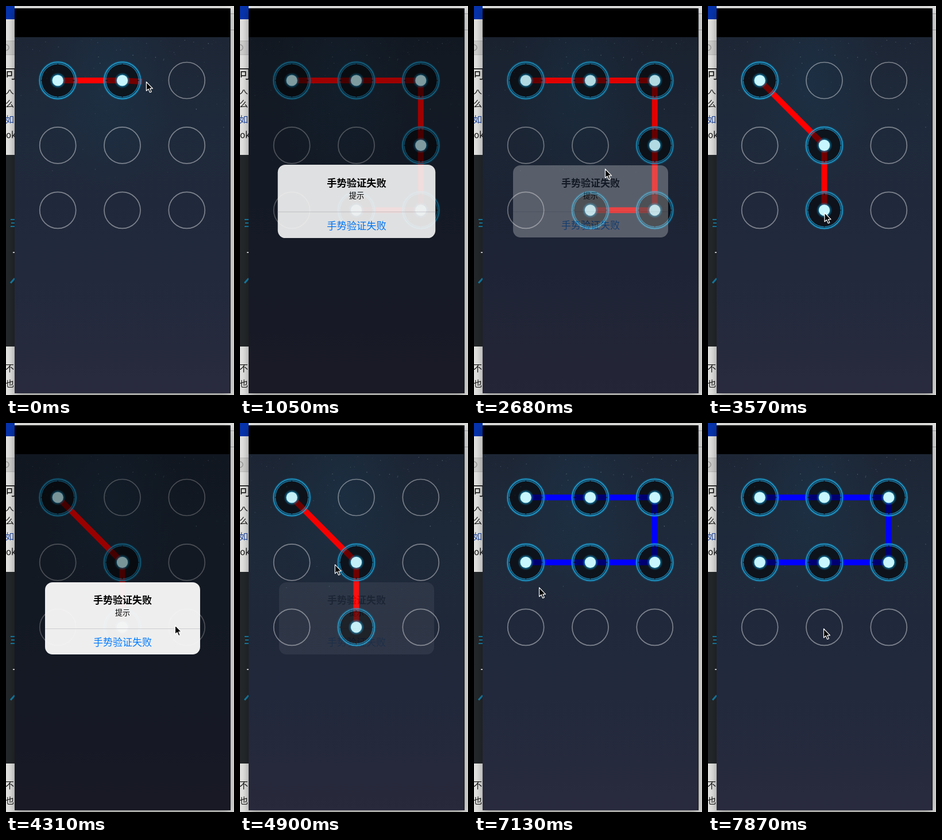
An HTML page that plays this animation: 397x674 px, repeating every 8000 ms.

```html
<!DOCTYPE html>
<html lang="zh">
<head>
<meta charset="utf-8">
<title>Gesture lock</title>
<style>
html, body { margin: 0; width: 100%; height: 100%; overflow: hidden; }
body {
  position: relative;
  background: #e3e3e1;
  font-family: "Noto Sans CJK SC", "Noto Sans CJK", "Noto Sans", sans-serif;
}
.page, .phone, .alert, .page *, .alert *, .layer { position: absolute; }
.page { inset: 0; overflow: hidden; }
.page span { left: -1px; line-height: 20px; white-space: nowrap; color: #111; font-size: 15px; font-weight: 500; }
.phone {
  left: 15px; top: 4px; width: 375px; height: 667px;
  overflow: hidden;
  background:
    radial-gradient(ellipse 120px 190px at 165px 125px, rgba(28,52,74,.6), rgba(28,50,72,0)),
    linear-gradient(#1d2635 50px, #1e2a3b 200px, #20293b 340px, #22293d 460px, #262a3d 590px, #292a3d);
}
.shadow {
  left: 15px; top: 4px; width: 376px; height: 667px;
  background: #14181f;
  box-shadow: 0 5px 14px rgba(0,0,0,.38);
}
.layer { left: 0; top: 0; }
.dim { inset: 0; background: #000; }
.alert {
  left: 52.5px; top: 271.5px; width: 270px; height: 124.5px;
  border-radius: 13px;
  background: rgba(250,250,250,.95);
  text-align: center;
}
.alert div { left: 0; width: 100%; line-height: 24px; color: #000; }
.alert .title { top: 17.5px; font-size: 17px; font-weight: 600; }
.alert .note { top: 39.5px; font-size: 13px; }
.alert .rule { top: 79.5px; height: 1px; background: #cdcdd1; }
.alert .ok { top: 90.5px; font-size: 17px; color: #007aff; }
</style>
</head>
<body>
<div class="page">
  <svg width="397" height="674">
    <rect width="15" height="23" fill="#0734ad"/>
    <rect y="60" width="15" height="24" fill="#cfcfcd"/>
    <path d="M0 60.5H15M0 84.5H15" stroke="#bbb"/>
    <circle cy="72" r="5" fill="none" stroke="#999" stroke-width="1.5"/>
    <path d="M390 13.5H397M390 41.5H397" stroke="#aaa"/>
    <rect y="258" width="15" height="332" fill="#25282a"/>
    <path d="M8 370H15M9 376H15M8 382H15" stroke="#1583ad" stroke-width="2"/>
    <path d="M8 480L15 472" stroke="#1583ad" stroke-width="3"/>
    <path d="M12 427H15" stroke="#ddd" stroke-width="2"/>
  </svg>
  <span style="left:-2px;top:105px;font-size:22px">可</span>
  <span style="top:136px;clip-path:inset(9px 0 0 0)">人</span>
  <span style="top:159px">么</span>
  <span style="top:186px;color:#1f469c">如</span>
  <span style="left:0;top:213px">ok</span>
  <span style="top:617px">不</span>
  <span style="top:644px">也</span>
  <div class="shadow"></div>
</div>

<div class="phone">
  <svg class="layer" width="375" height="667" viewBox="15 4 375 667">
    <defs>
      <radialGradient id="glow">
        <stop offset=".6" stop-color="#20aee4" stop-opacity=".8"/>
        <stop offset="1" stop-color="#0a78a8" stop-opacity="0"/>
      </radialGradient>
      <circle id="off" r="31.5" fill="none" stroke="#fff" stroke-opacity=".42" stroke-width="1.7"/>
      <g id="on">
        <circle r="28" fill="#000" fill-opacity=".55"/>
        <circle r="30" fill="none" stroke="#0b4a66" stroke-opacity=".4" stroke-width="4"/>
        <circle r="32" fill="none" stroke="#128fc6" stroke-opacity=".3" stroke-width="4"/>
        <circle r="31.8" fill="none" stroke="#22a9dc" stroke-width="1.2"/>
        <circle r="28.8" fill="none" stroke="#1b8ebd" stroke-width="1"/>
        <path d="M0 -29V-26M0 29V26M-29 0H-26M29 0H26" stroke="#10141c" stroke-width="1.5"/>
        <circle r="14" fill="url(#glow)"/>
        <circle r="9.6" fill="#c8f6ff"/>
      </g>
    </defs>
    <g id="stars" fill="#a9c0cf"></g>
    <rect x="15" y="4" width="375" height="50"/>
    <polyline id="line" fill="none" stroke-width="10"/>
    <g id="nodes"></g>
  </svg>
  <div class="layer dim" id="dim"></div>
  <div class="alert" id="alert">
    <div class="title">手势验证失败</div>
    <div class="note">提示</div>
    <div class="rule"></div>
    <div class="ok">手势验证失败</div>
  </div>
  <svg class="layer" width="375" height="667" viewBox="15 4 375 667">
    <path id="cursor" d="M.5 .5V16L4.1 12.8L6.7 18.7L9.3 17.6L6.8 11.9H11.5Z"
      stroke="#fff" stroke-width="1.2" stroke-linejoin="round"/>
  </svg>
</div>

<script>
const LOOP = 8000, STEP = 148.5, FADE = 270, OVERSHOOT = 0.25;
const $ = id => document.getElementById(id);
const center = i => [90.2 + i % 3 * 112.3, 129 + Math.floor(i / 3) * 112.4];
const mix = (a, b, k) => a.map((v, i) => v + (b[i] - v) * k);

// The finger meets one node every `gap` ms; `then` is where it goes after lifting.
const gestures = [
  { nodes: [0, 1, 2, 5, 8, 7], start: -260, gap: 190, hide: 2480,
    then: [[1780, 222, 385], [2530, 222, 385], [2673, 228, 282]] },
  { nodes: [0, 4, 7], start: 3100, gap: 230, hide: 4650,
    then: [[4306, 294, 350], [4650, 250, 385], [4900, 165, 245]] },
  { nodes: [0, 1, 2, 5, 4, 3], start: 5333, gap: 260, correct: true,
    then: [[7870, 201, 356]] }
];

const path = [];
for (const g of gestures) {
  const keys = g.nodes.map((n, k) => {
    const [x, y] = center(n);
    return [g.start + k * g.gap, x, y + 2];
  });
  keys.push(mix(...keys.slice(-2), 1 + OVERSHOOT));
  g.up = keys[keys.length - 1][0];
  g.show = g.up + 125;
  g.clear = g.correct ? LOOP : g.hide + 300;
  path.push(...keys, ...g.then);
}

function pointer(t) {
  const i = path.findIndex(p => p[0] > t);
  if (i < 0) return path[path.length - 1].slice(1);
  const a = path[i - 1], b = path[i];
  return mix(a, b, (t - a[0]) / (b[0] - a[0])).slice(1);
}

function makeStars() {
  let seed = 11, out = '';
  const rnd = () => (seed = seed * 16807 % 2147483647) / 2147483647;
  for (let i = 0; i < 90; i++) {
    const x = 20 + rnd() * 365, y = 58 + rnd() * rnd() * 300, o = 0.1 + 0.4 * rnd() ** 3;
    out += `<circle cx="${x}" cy="${y}" r=".7" opacity="${o}"/>`;
  }
  $('stars').innerHTML = out;
}

function makeNodes() {
  for (let i = 0; i < 9; i++) {
    $('nodes').innerHTML += `<use href="#off" transform="translate(${center(i)})"/>`;
  }
}

function drawPattern(t, g) {
  const hit = g ? g.nodes.filter((n, k) => g.start + k * g.gap <= t) : [];
  const points = hit.map(center);
  if (g && t < g.up) points.push(pointer(t - 12));
  $('line').setAttribute('points', points.join(' '));
  $('line').setAttribute('stroke', g && g.correct && t >= g.up ? '#00f' : '#f00');
  [...$('nodes').children].forEach((n, i) => n.setAttribute('href', hit.includes(i) ? '#on' : '#off'));
}

function drawAlert(t, g) {
  let alpha = 0, scale = 1;
  if (g && !g.correct && t >= g.show) {
    const rest = Math.exp((g.show - t) * 0.014);
    scale = 1 + 0.2 * rest;
    alpha = t < g.hide ? 1 - rest ** 1.1 : Math.max(0, 1 - (t - g.hide) / FADE);
  }
  $('alert').style.opacity = alpha;
  $('alert').style.transform = `scale(${scale})`;
  $('dim').style.opacity = 0.4 * alpha;
}

function drawCursor(t, g) {
  const opening = g && !g.correct && t >= g.show && t < g.show + 300;
  $('cursor').setAttribute('transform', `translate(${pointer(t)})`);
  $('cursor').setAttribute('visibility', opening ? 'hidden' : 'visible');
}

function draw(now) {
  const t = Math.floor((now % LOOP + 3) / STEP) * STEP;
  const g = gestures.find(g => t >= g.start && t < g.clear);
  drawPattern(t, g);
  drawAlert(t, g);
  drawCursor(t, g);
}

makeStars();
makeNodes();
const start = performance.now();
function frame() {
  draw(performance.now() - start);
  requestAnimationFrame(frame);
}
frame();
</script>
</body>
</html>
```
